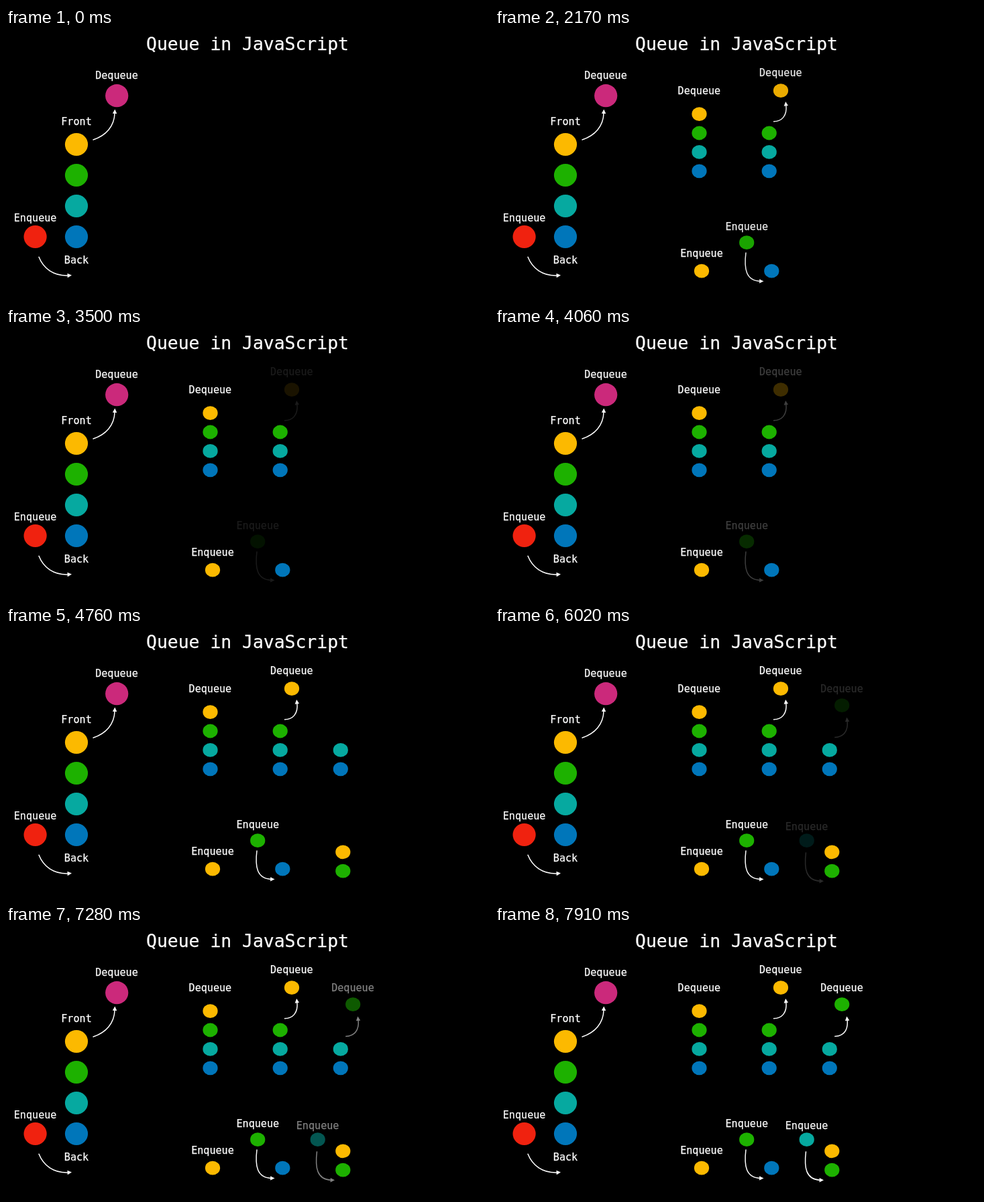
Animation, 720 px wide and 405 px high, one loop 8000 ms. Source, as an HTML page:

```html
<!DOCTYPE html>
<html lang="en">
<head>
<meta charset="utf-8">
<title>Queue in JavaScript</title>
<style>
html, body { margin: 0; width: 100%; height: 100%; overflow: hidden; background: #000; }
svg { display: block; width: 100vw; height: 100vh; }
text {
  font-family: "DejaVu Sans Mono", monospace; font-size: 15.1px;
  text-anchor: middle; fill: #fff; stroke: #fff; stroke-width: .25px;
}
.title { font-size: 26.4px; }
.line { fill: none; stroke: #fff; stroke-width: 1.5px; }
.head { fill: #fff; }
</style>
</head>
<body>
<svg id="stage" viewBox="0 0 720 405"></svg>
<script>
const NS = "http://www.w3.org/2000/svg";
const stage = document.getElementById("stage");
const ORANGE = "#fcb900", GREEN = "#1db100", TEAL = "#06a9a0",
      BLUE = "#0076ba", RED = "#f0220f", PINK = "#cb297b";

function add(parent, tag, attrs, content) {
  const el = document.createElementNS(NS, tag);
  for (const k in attrs) el.setAttribute(k, attrs[k]);
  if (content) el.textContent = content;
  parent.appendChild(el);
  return el;
}
const group = () => add(stage, "g", {});
const label = (g, x, y, s) => add(g, "text", { x, y }, s);
const ball = (g, cx, cy, fill) => add(g, "circle", { cx, cy, r: 17.1, fill });
const dot = (g, cx, cy, fill) => add(g, "ellipse", { cx, cy, rx: 11.1, ry: 10.4, fill });

// Curve plus a triangular head at (x, y), turned by angle
function arrow(g, d, x, y, angle, dx = 0, dy = 0) {
  const a = add(g, "g", { transform: `translate(${dx} ${dy})` });
  add(a, "path", { d, class: "line" });
  add(a, "path", {
    d: "M0 0L-6.4 -3.2V3.2Z", class: "head",
    transform: `translate(${x} ${y}) rotate(${angle})`
  });
}
const upArrow = (g, dx, dy) =>
  arrow(g, "M415 139.8C428 139.5 435.500 131 433.900 115.500", 433.2, 110, -96, dx, dy);
const downArrow = (g, dx, dy) =>
  arrow(g, "M374 335.500C371 360 374 377.500 395 378.400", 400.5, 378.5, 1, dx, dy);

const base = group();
add(base, "text", { x: 360, y: 32.6, class: "title" }, "Queue in JavaScript");
label(base, 165, 76.3, "Dequeue");
label(base, 105, 145, "Front");
label(base, 105, 352, "Back");
label(base, 43.6, 289, "Enqueue");
ball(base, 165.2, 101.2, PINK);
[ORANGE, GREEN, TEAL, BLUE].forEach((c, i) => ball(base, 105, 174 + 46 * i, c));
ball(base, 43.6, 312, RED);
arrow(base, "M129.500 167.200C149 161 161.500 147 162.100 127", 162.3, 121.5, -88);
arrow(base, "M48.800 341.800C56 360 71 370.500 92 370", 98, 369.6, -3);

const rowY = i => 128.6 + 28.4 * i;

const col1 = group();
label(col1, 304.4, 98.7, "Dequeue");
[ORANGE, GREEN, TEAL, BLUE].forEach((c, i) => dot(col1, 304.5, rowY(i), c));
label(col1, 308, 342.2, "Enqueue");
dot(col1, 308, 363.2, ORANGE);

const col2 = group();
[GREEN, TEAL, BLUE].forEach((c, i) => dot(col2, 408.7, rowY(i + 1), c));
dot(col2, 412.3, 363.2, BLUE);

const move2 = group();
label(move2, 425.8, 72.3, "Dequeue");
dot(move2, 426, 93.6, ORANGE);
upArrow(move2, 0, 0);
label(move2, 375.3, 302, "Enqueue");
dot(move2, 375.2, 320.7, GREEN);
downArrow(move2, 0, 0);

const col3 = group();
[TEAL, BLUE].forEach((c, i) => dot(col3, 498.8, rowY(i + 2), c));
dot(col3, 502.3, 337.8, ORANGE);
dot(col3, 502.3, 366.2, GREEN);

const move3 = group();
label(move3, 517, 98.7, "Dequeue");
dot(move3, 517.2, 118.6, GREEN);
upArrow(move3, 91.2, 26.6);
label(move3, 464.6, 305, "Enqueue");
dot(move3, 464.7, 320.7, TEAL);
downArrow(move3, 89.5, 2.8);

const LOOP = 8000, STEP = 70, PERIOD = 528;

// Four smooth blinks beginning at start
function blink(t, start) {
  const p = t - start;
  if (p <= 0 || p >= PERIOD * 4 - 35) return 1;
  return (1 + Math.cos(2 * Math.PI * p / PERIOD)) / 2;
}
const show = (el, opacity) => el.setAttribute("opacity", opacity);

function draw(time) {
  const t = Math.floor((time % LOOP) / STEP) * STEP;
  show(col1, t >= 560 ? 1 : 0);
  show(col2, t >= 1120 ? 1 : 0);
  show(move2, t >= 1610 ? blink(t, 2125) : 0);
  show(col3, t >= 4760 ? 1 : 0);
  show(move3, t >= 5320 ? blink(t, 5826) : 0);
}

let origin = null;
function tick(now) {
  if (origin === null) origin = now;
  draw(now - origin);
  requestAnimationFrame(tick);
}
draw(0);
requestAnimationFrame(tick);
</script>
</body>
</html>
```
